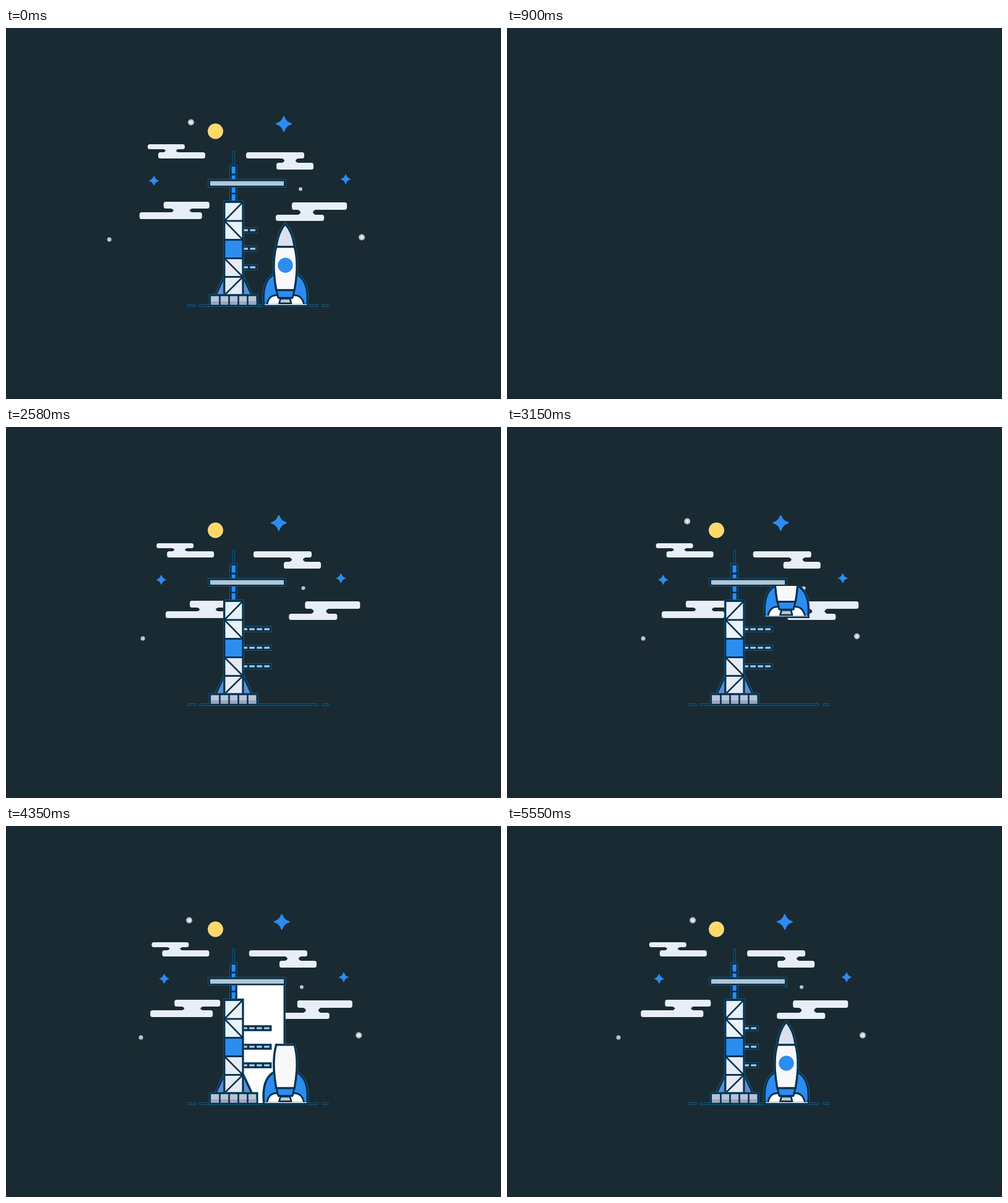
An HTML page with a canvas for the animation above (5580 ms loop, 800x600 px).

```html
<!DOCTYPE html>
<html lang="en">
<head>
<meta charset="utf-8">
<title>Launch pad</title>
<style>
html, body { margin: 0; width: 100%; height: 100%; overflow: hidden; background: #1a2a32; }
canvas { display: block; }
</style>
</head>
<body>
<canvas id="stage" width="800" height="600"></canvas>
<script>
const ctx = document.getElementById('stage').getContext('2d');
const LOOP = 5580, STEP = 30;
const NAVY = '#032f4c', HALO = '#236489', BLUE = '#2d8cf0', CLOUD = '#e8eef8', GREY = '#b6c7d2';
let now = 0;

const clamp = v => Math.max(0, Math.min(1, v));
const lerp = (a, b, p) => a + (b - a) * p;
const span = (a, b) => clamp((now - a) / (b - a));
const easeOut = p => 1 - (1 - p) ** 3;
const smooth = p => p * p * (3 - 2 * p);

// Horizontal position: slow drift, then an accelerating exit to the left.
const drift = v => v * (Math.min(now, LOOP) - LOOP) / 1000;
const leave = t0 => Math.max(0, 0.012 * (now - LOOP - t0)) ** 3;

function layer(fn) {
  ctx.save();
  fn();
  ctx.restore();
}

function clip(x, y, w, h) {
  ctx.beginPath();
  ctx.rect(x, y, w, h);
  ctx.clip();
}

function rect(x1, y1, x2, y2, fill) {
  ctx.fillStyle = fill;
  ctx.fillRect(x1, y1, x2 - x1, y2 - y1);
}

function frame(x1, y1, x2, y2, fill, edge = 3) {
  rect(x1 - 0.7, y1 - 0.7, x2 + 0.7, y2 + 0.7, HALO);
  rect(x1, y1, x2, y2, NAVY);
  if (fill) rect(x1 + edge, y1 + edge, x2 - edge, y2 - edge, fill);
}

function line(x1, y1, x2, y2, w = 2.8) {
  ctx.beginPath();
  ctx.moveTo(x1, y1);
  ctx.lineTo(x2, y2);
  ctx.lineWidth = w;
  ctx.strokeStyle = NAVY;
  ctx.stroke();
}

function shape(d, fill, halo) {
  const p = new Path2D(d);
  ctx.lineJoin = 'round';
  if (halo) {
    ctx.lineWidth = 4.4;
    ctx.strokeStyle = HALO;
    ctx.stroke(p);
  }
  ctx.fillStyle = fill;
  ctx.fill(p);
  ctx.lineWidth = 2.8;
  ctx.strokeStyle = NAVY;
  ctx.stroke(p);
}

function disc(x, y, r, fill) {
  if (r <= 0) return;
  ctx.fillStyle = fill;
  ctx.beginPath();
  ctx.arc(x, y, r, 0, Math.PI * 2);
  ctx.fill();
}

// Bars are [x1, y1, x2, y2]; the neck between them is [x1, x2].
function cloud(top, low, neck, v, t0, start) {
  const s = easeOut(span(start, start + 500));
  if (!s) return;
  const cx = (neck[0] + neck[1]) / 2, cy = (top[3] + low[1]) / 2;
  layer(() => {
    ctx.translate(cx + drift(v) - leave(t0), cy);
    ctx.scale(s, s);
    ctx.translate(-cx, -cy);
    ctx.fillStyle = CLOUD;
    for (const [x1, y1, x2, y2] of [top, low]) {
      ctx.beginPath();
      ctx.roundRect(x1, y1, x2 - x1, y2 - y1, 3.5);
      ctx.fill();
    }
    const [a, b] = neck, y1 = top[3] - 0.5, y2 = low[1] + 0.5, g = 5;
    ctx.beginPath();
    ctx.moveTo(a - g, y1);
    ctx.quadraticCurveTo(a + g, cy, a - g, y2);
    ctx.lineTo(b + g, y2);
    ctx.quadraticCurveTo(b - g, cy, b + g, y1);
    ctx.fill();
  });
}

function star(x, y, r, v, t0, start) {
  const s = r * easeOut(span(start, start + 250));
  if (!s) return;
  layer(() => {
    ctx.translate(x + drift(v) - leave(t0), y);
    ctx.scale(s, s);
    const c = 0.2;
    ctx.beginPath();
    ctx.moveTo(0, -0.92);
    ctx.quadraticCurveTo(c, -c, 0.92, 0);
    ctx.quadraticCurveTo(c, c, 0, 0.92);
    ctx.quadraticCurveTo(-c, c, -0.92, 0);
    ctx.quadraticCurveTo(-c, -c, 0, -0.92);
    ctx.fillStyle = ctx.strokeStyle = BLUE;
    ctx.lineWidth = 0.16;
    ctx.lineJoin = 'round';
    ctx.fill();
    ctx.stroke();
  });
}

function dot(x, y, r, v, t0, start) {
  const s = easeOut(span(start, start + 250));
  const px = x + drift(v) - leave(t0);
  disc(px, y, r * s, GREY);
  if (r > 4) disc(px, y, 2.2 * s, '#eef3f6');
}

function sky() {
  dot(301, 152.5, 5, 4, -105, 2950);
  dot(575, 338.5, 5, 3.9, 82, 3000);
  dot(476, 260.5, 3, -1.5, 181, 2300);
  dot(216, 342, 3.5, -1.7, -305, 2300);
  star(449, 155, 13, 2.7, 187, 2230);
  star(549, 244.5, 8, 2.6, 197, 2300);
  star(259, 247, 8, 2.7, -226, 2260);

  const s = easeOut(span(1850, 2150)), x = 338.5 - leave(73);
  disc(x, 167, 12.4 * s, '#fbeec0');
  disc(x, 167, 11.7 * s, '#ffd966');

  cloud([230, 188, 290, 196], [247, 201, 323, 211], [259, 276], -4.4, -85, 1376);
  cloud([388, 201, 482, 211], [437, 218, 497, 229], [450, 468], -4, 42, 1430);
  cloud([255, 281, 329, 292], [216, 298, 317, 309], [271, 297], -14, -50, 1450);
  cloud([462, 282, 551, 294], [436, 302, 514, 312], [476, 496], -7.1, 132, 1368);
}

function ground() {
  const p = span(1070, 1546);
  if (!p) return;
  layer(() => {
    ctx.translate(-leave(118), 0);
    clip(290, 440, 4 + 228 * (1 - (1 - p) ** 2), 20);
    for (const [a, b] of [[294, 306.5], [312.5, 504], [511, 521]]) {
      ctx.beginPath();
      ctx.roundRect(a - 0.5, 447, b - a + 1, 4, 1.5);
      ctx.fillStyle = HALO;
      ctx.fill();
      rect(a + 0.3, 447.8, b - 0.3, 450.2, NAVY);
    }
  });
}

// The crane lowers three rocket sections, retracting its arm between trips.
const PARTS = [
  { top: 396, end: 450, start: 2850, land: 3430, free: 3440, up: 3530 },
  { top: 352, end: 396, start: 3850, land: 4300, free: 4380, up: 4480 },
  { top: 312, end: 352, start: 4780, land: 5200, free: 5230, up: 5580 }
];
const partTop = p => {
  const k = span(p.start, p.land);
  return lerp(257 - (p.end - p.top), p.top, p === PARTS[0] ? k * k : smooth(k));
};

function armReach() {
  let e = smooth(span(2200, 2400));
  for (const [a, b, c, d] of [[3520, 3630, 3660, 3850], [4480, 4570, 4600, 4780]]) {
    e -= 0.65 * (smooth(span(a, b)) - smooth(span(c, d)));
  }
  return e;
}

function cable() {
  for (const p of PARTS) {
    if (now < p.start || now >= p.up) continue;
    const y = lerp(Math.max(257, partTop(p)), 257, span(p.free, p.up));
    if (now >= p.land && now < p.free) rect(371, 256, 450, 448, '#fff');
    if (y > 257) {
      rect(448.4, 255, 451.9, y, HALO);
      rect(449, 255, 451.2, y, NAVY);
    }
  }
}

function base() {
  const p = easeOut(span(1200, 1370));
  if (!p) return;
  layer(() => {
    ctx.translate(0, 449);
    ctx.scale(1, p);
    ctx.translate(0, -449);
    frame(328.5, 431, 407, 450, '#b9c4d6', 2.6);
    rect(331, 442, 404.5, 447.5, '#9aa6bf');
  });
  for (let i = 0; i < 4; i++) {
    const k = span(1365 + i * 40, 1410 + i * 40);
    if (k) line(345.5 + 15 * i, 448, 345.5 + 15 * i, 448 - 15 * k, 2.6);
  }
}

function arms() {
  const end = 383 + 46 * smooth(span(2300, 2530)) - 23 * smooth(span(4320, 4900));
  if (end <= 384) return;
  for (const y of [327, 357, 387]) {
    layer(() => {
      clip(383, y - 8, 60, 16);
      frame(380, y - 4.2, end, y + 4.2);
      for (let x = end - 3; x > 384; x -= 12) rect(x - 8.7, y - 1.6, x, y + 1.6, GREY);
    });
  }
}

function mast() {
  const p = span(2000, 2200);
  if (!p) return;
  layer(() => {
    clip(355, 281 - 84 * p, 25, 90 * p);
    frame(366.4, 200, 369.2, 223);
    frame(362, 221.5, 373.2, 283);
    for (const [a, b] of [[224, 235.5], [238.5, 249], [258, 266.5], [269, 279.5]]) {
      rect(364.7, a, 370.7, b, BLUE);
    }
  });
}

function tower() {
  const b = smooth(span(2050, 2250));
  if (b) {
    layer(() => {
      clip(330, 433 - 35 * b, 80, 35 * b);
      shape('M353 402L339 432H353Z', '#5f8fd0', true);
      shape('M383 402L397 432H383Z', '#5f8fd0', true);
    });
  }
  const p = span(1480, 2030);
  if (!p) return;
  layer(() => {
    clip(345, 434 - 156 * p, 45, 156 * p);
    frame(351.6, 279.7, 384, 433.5);
    const ys = [281.5, 312, 342.5, 372.5, 402.5, 432];
    ['#e8f0f8', '#e9f4fa', BLUE, '#e6ebf5', '#e6ebf5'].forEach((c, i) => {
      const y1 = ys[i] + 1.4, y2 = ys[i + 1] - 1.4;
      rect(354.4, y1, 381.4, y2, c);
      if (i === 2) return;
      const up = i % 4 === 0;
      line(354.4, up ? y2 : y1, 381.4, up ? y1 : y2, 2.6);
    });
  });
}

function bar() {
  const e = armReach();
  if (e <= 0) return;
  const x1 = 367.5 - 40.5 * e ** 1.4, x2 = 367.5 + 84.5 * e;
  frame(x1, 245, x2, 257, null);
  if (x2 - x1 > 6) rect(x1 + 3, 247.7, x2 - 3, 255, '#b3c6d2');
  if (e < 0.95 && e > 0.2) line(x2 - 9.5, 246, x2 - 9.5, 256, 2.4);
}

function rocketArt() {
  const hull = 'M437 354C432 372 432 396 437 424H466C471 396 471 372 466 354Z';
  const nose = 'M451.3 317C444 326 438.5 340 437 354H466C464.500 340 459 326 451.300 317Z';
  shape('M434 398C420 405 414.500 422 417 448H486.500C489 422 483 405 469 398Z', BLUE, true);
  shape('M421.500 448C424 436 429 432 438 432H465C474 432 479 436 482 448Z', '#fff');
  shape(hull, '#f8f8fa', true);
  shape(nose, '#dbe0f0', true);
  shape(hull, '#f8f8fa');
  shape('M437 424H466L463 436.500H440Z', BLUE);
  shape('M443.500 437.500H459L461 445.500H441.500Z', '#b9c4d6');
  rect(418, 446.8, 486, 448, '#fff');
  rect(415, 448, 489, 450.4, NAVY);
}

function rocket() {
  for (const p of PARTS) {
    if (now < p.start) continue;
    layer(() => {
      clip(405, 257, 95, 200);
      ctx.translate(0, partTop(p) - p.top);
      clip(405, p.top, 95, p.end - p.top + (p.end === 450 ? 2 : 0));
      rocketArt();
    });
  }
  disc(451.5, 383.7, 12.2 * easeOut(span(5120, 5380)), BLUE);
}

function draw(t) {
  now = t < 1000 ? t + LOOP : t;
  rect(0, 0, 800, 600, '#1a2a32');
  sky();
  ground();
  layer(() => {
    ctx.translate(-leave(80), 0);
    cable();
    arms();
    mast();
    tower();
    base();
    bar();
    rocket();
  });
}

function tick() {
  const t = performance.now() % LOOP;
  draw(Math.floor(t / STEP) * STEP);
  requestAnimationFrame(tick);
}
tick();
</script>
</body>
</html>
```
